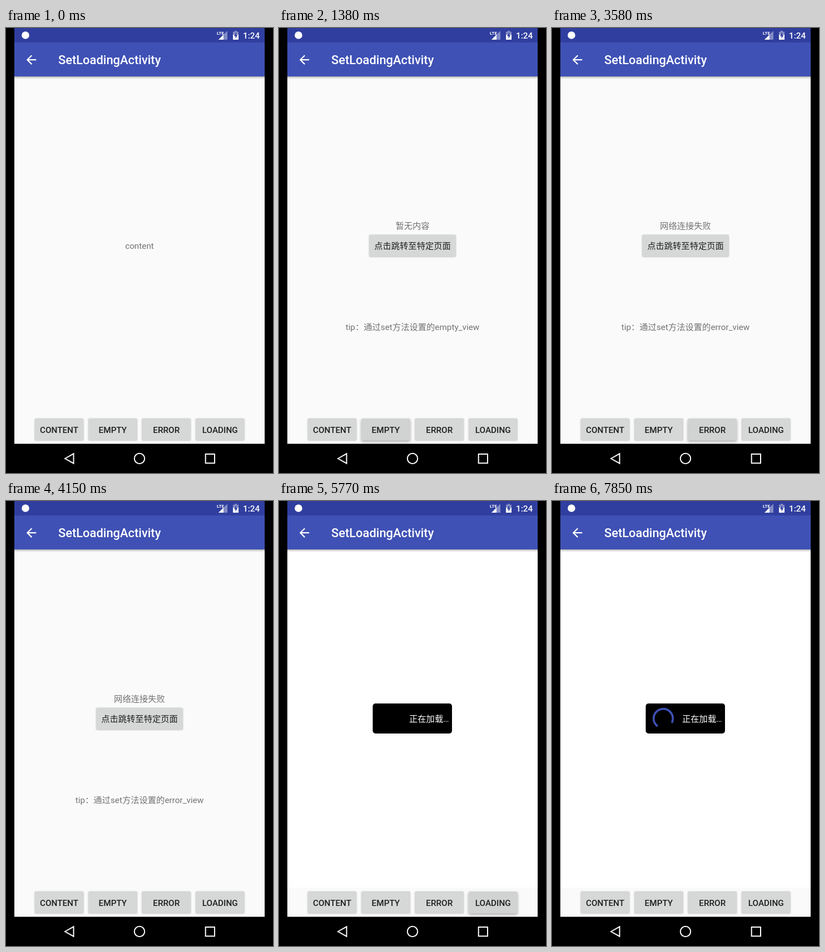
Animation, 480 px wide and 800 px high, one loop 7.97 s. Source, as an HTML page:

```html
<!DOCTYPE html>
<html lang="zh-CN">
<head>
<meta charset="utf-8">
<title>SetLoadingActivity</title>
<style>
  html, body { margin: 0; width: 100%; height: 100%; overflow: hidden; background: #000; }
  svg { display: block; width: 480px; height: 800px; }
  text { font: 15.3px Roboto, 'Noto Sans CJK SC', sans-serif; fill: #737373; }
  .mid { text-anchor: middle; }
  .strong { font-weight: 500; }
  .button rect { fill: #d6d7d7; }
  .button text { fill: #1f1f1f; }
  .light { fill: #fff; }
  .nav { fill: none; stroke: #fff; stroke-width: 2; }
</style>
</head>
<body>
<svg viewBox="0 0 480 800">
  <defs>
    <linearGradient id="shade" x2="0" y2="1">
      <stop stop-opacity=".32"/>
      <stop offset=".4" stop-opacity=".14"/>
      <stop offset="1" stop-opacity="0"/>
    </linearGradient>
  </defs>
  <rect width="480" height="800"/>
  <rect x="15" y="87" width="450" height="660.5" fill="#fafafa"/>
  <rect id="blank" x="15" y="87" width="450" height="608" fill="#fff"/>

  <rect x="15" width="450" height="26" fill="#303f9f"/>
  <rect x="15" y="26" width="450" height="61" fill="#3f51b5"/>
  <rect x="15" y="87" width="450" height="5" fill="url(#shade)"/>

  <g class="light">
    <circle cx="35" cy="13" r="6.8"/>
    <path d="M398 5V21H382Z" opacity=".4"/>
    <path d="M391 12V21H382Z"/>
    <text x="379" y="12" class="light" style="font-size:8px;font-weight:700">LTE</text>
    <path d="M411 5h4v1.7h3V12h-10V6.7h3Z" opacity=".4"/>
    <path d="M408 12h10v9h-10Z"/>
    <path d="M414 8l-4.2 6.4h2.7v4.6l4-6.5h-2.5Z" fill="#303f9f"/>
    <text x="426" y="19" class="light strong">1:24</text>
    <path transform="translate(32.4 44) scale(1.094)" d="M20 11H7.83l5.59-5.59L12 4l-8 8 8 8 1.41-1.41L7.83 13H20Z"/>
    <text x="94" y="65.3" class="light strong" style="font-size:21.9px">SetLoadingActivity</text>
  </g>

  <g id="views"></g>
  <g id="bar"></g>

  <g class="nav">
    <path d="M106 774L121.5 765.3V782.7Z"/>
    <circle cx="240" cy="774" r="9.2"/>
    <rect x="358.7" y="766" width="16.3" height="16.3"/>
  </g>
</svg>

<script>
const LOOP = 7970, STEP = 115.5;
const $ = id => document.getElementById(id);

const label = (x, y, text, cls = 'mid') => `<text x="${x}" y="${y}" class="${cls}">${text}</text>`;
const button = (x, y, w, h, text, cls) => `<g class="button">
  <rect x="${x}" y="${y}" width="${w}" height="${h}" rx="2.2"/>
  ${label(x + w / 2, y + h / 2 + 5.6, text, 'mid ' + cls)}</g>`;
const notice = (title, tip) => label(240, 360.5, title)
  + button(162.2, 372, 155.6, 39.4, '点击跳转至特定页面', '')
  + label(240, 543.3, `tip：通过set方法设置的${tip}`);

const views = [
  label(240, 397, 'content'),
  notice('暂无内容', 'empty_view'),
  notice('网络连接失败', 'error_view'),
  `<rect x="168.5" y="364" width="142.5" height="54" rx="5"/>
   <circle id="spinner" cx="200" cy="391" r="17.3" pathLength="360" fill="none"
     stroke="#3f51b5" stroke-width="3.7" stroke-linecap="square"/>
   <text x="234" y="397" class="light">正在加载…</text>`
];
$('views').innerHTML = views.map(v => `<g>${v}</g>`).join('');
$('bar').innerHTML = ['CONTENT', 'EMPTY', 'ERROR', 'LOADING']
  .map((name, i) => button(51.7 + 96.4 * i, 702.2, 87.6, 39.4, name, 'strong')).join('');

const groups = [...$('views').children];
const faces = [...document.querySelectorAll('.button rect')];
const keys = faces.slice(-4);

// Touches of the bar buttons, in steps: the view opens on release.
const taps = [
  { key: 1, down: 7, up: 12 },
  { key: 2, down: 25, up: 31 },
  { key: 3, down: 46, up: 50 }
];
const SPIN_START = 6077, CYCLE = 1333;

const ramp = (t, a, b) => Math.min(1, Math.max(0, (t - a) / (b - a)));
const mix = (a, b, k) => a + (b - a) * k;

// Cubic easing with control points (x1, 0) and (x2, 1).
function ease(x, x1, x2) {
  let lo = 0, hi = 1, s = 0.5;
  for (let i = 0; i < 24; i++) {
    s = (lo + hi) / 2;
    const at = 3 * x1 * s * (1 - s) ** 2 + 3 * x2 * s * s * (1 - s) + s ** 3;
    if (at < x) lo = s; else hi = s;
  }
  return s * s * (3 - 2 * s);
}

function paintKey(el, lift, ink) {
  const tone = [214, 215, 215].map(c => Math.round(c * (1 - 0.025 * ink)));
  el.style.fill = `rgb(${tone})`;
  el.style.filter = `drop-shadow(0 ${mix(0.9, 2, lift)}px ${mix(0.9, 2.5, lift)}px rgba(0,0,0,${mix(0.28, 0.34, lift)}))`;
}

function paintSpinner(t) {
  const age = t - SPIN_START;
  const spinner = $('spinner');
  spinner.style.display = age < 0 ? 'none' : '';
  if (age < 0) return;
  const p = age % CYCLE / CYCLE;
  const tail = 270 * ease(ramp(p, 0.5, 1), 0.4, 0.2);
  const head = 270 * ease(ramp(p, 0, 0.5), 0.4, 0.2);
  const turn = age * 720 / (5 * CYCLE) + 90 * p + tail - 90;
  spinner.setAttribute('stroke-dasharray', `${Math.max(0.1, head - tail)} 360`);
  spinner.setAttribute('transform', `rotate(${turn} 200 391)`);
}

function draw(now) {
  // The small lead absorbs the rounding of step times.
  const k = Math.min(68, Math.floor((now % LOOP + 6.5) / STEP));

  const shown = taps.reduce((view, tap) => k >= tap.up ? tap.key : view, 0);
  groups.forEach((g, i) => g.style.display = i === shown ? '' : 'none');
  $('blank').style.display = shown === 3 ? '' : 'none';

  for (const { key, down, up } of taps) {
    const press = ramp(k, down, down + 3);
    paintKey(keys[key], press * (1 - ramp(k, up, up + 2)), press * (1 - ramp(k, up, up + 5)));
  }
  paintSpinner(k * STEP);
}

faces.forEach(el => paintKey(el, 0, 0));
const start = performance.now();
function tick() {
  draw(performance.now() - start);
  requestAnimationFrame(tick);
}
tick();
</script>
</body>
</html>
```
